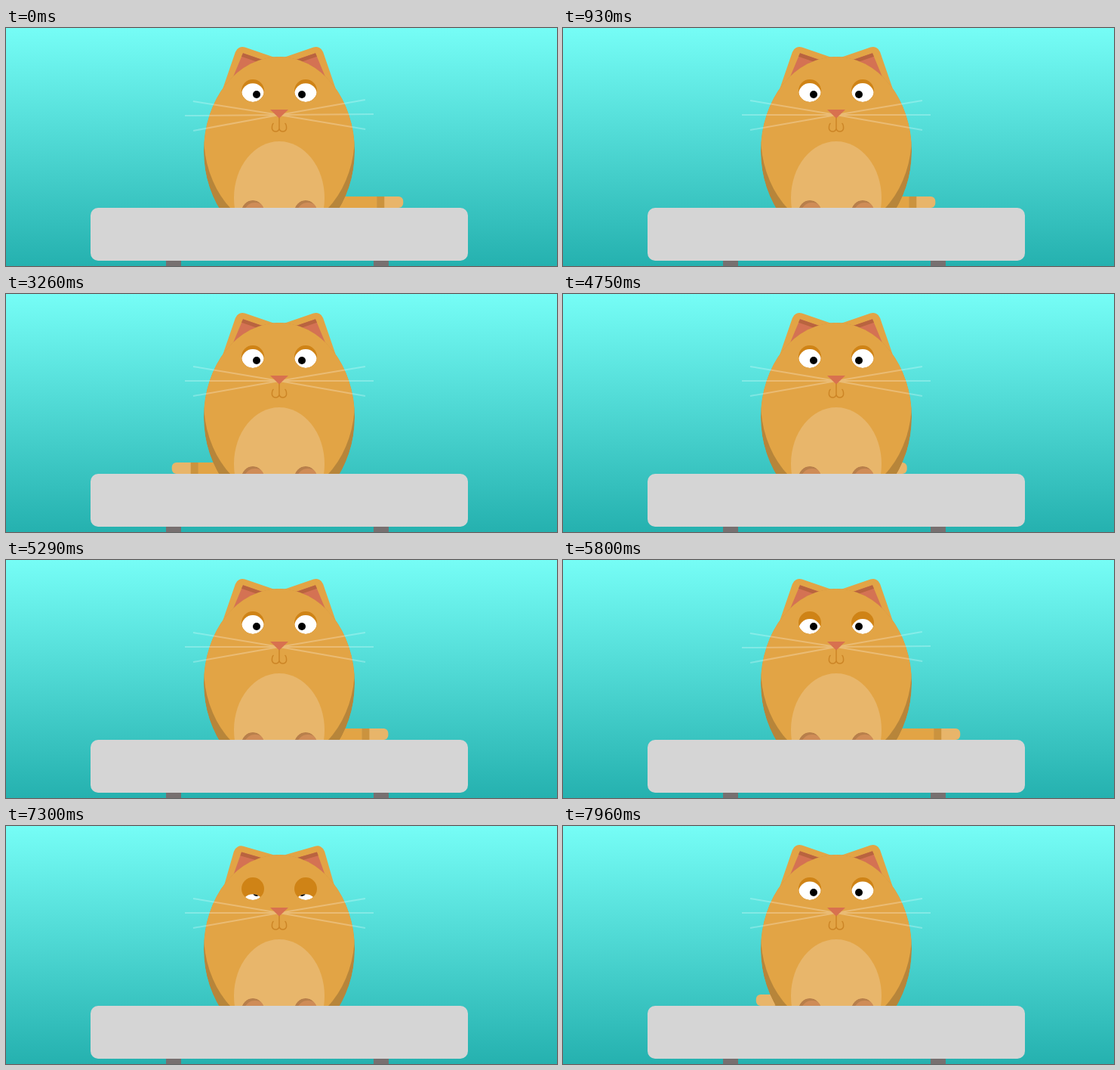
An HTML page that plays this animation: 730 by 315 pixels, repeating every 8 s.

```html
<!DOCTYPE html>
<html lang="en">
<head>
<meta charset="utf-8">
<title>Cat on a table</title>
<style>
  html, body { margin: 0; width: 100%; height: 100%; overflow: hidden; }
  svg { display: block; width: 100vw; height: 100vh; }
</style>
</head>
<body>
<svg viewBox="0 0 730 315">
  <defs>
    <linearGradient id="sky" x2="0" y2="1">
      <stop stop-color="#76fdf6"/>
      <stop offset="1" stop-color="#25b1af"/>
    </linearGradient>
    <clipPath id="bodyClip"><ellipse cx="362" cy="163" rx="100" ry="125"/></clipPath>
    <clipPath id="eyeClip"><circle r="15"/></clipPath>
    <clipPath id="lidClip"><circle id="lid" r="15"/></clipPath>
    <clipPath id="pawClip"><circle r="15"/></clipPath>

    <g id="ear">
      <g id="earTurn">
        <rect x="-45" y="-36" width="60" height="75" rx="10" fill="#e2a445"/>
        <path d="M-35-28H12V20H-38Z" fill="#d47253"/>
        <path d="M-35-28H12V-23H-35.4Z" fill="#b9643f"/>
      </g>
    </g>
    <g id="eye">
      <circle r="15" fill="#cf8316"/>
      <g clip-path="url(#eyeClip)">
        <g clip-path="url(#lidClip)">
          <circle r="15" fill="#fff"/>
          <circle cx="5" cy="5" r="5"/>
        </g>
      </g>
    </g>
    <g id="paw" clip-path="url(#pawClip)">
      <circle r="15" fill="#b87f4b"/>
      <circle cx="3" cy="3" r="15" fill="#cf8c57"/>
    </g>
    <path id="hook" d="M362 133.500A5 5 0 0 1 352.500 133.500Q352 128 354.500 126"/>
    <path id="side" d="M362 115L248 96M362 115H237M362 115L248 135"/>
  </defs>

  <rect width="730" height="315" fill="url(#sky)"/>

  <g id="tail">
    <rect x="-50" y="223" width="100" height="15" rx="6" fill="#e8b56a"/>
    <path d="M-50 223H15V238H-50Z" fill="#e2a445"/>
    <path d="M15 223H25V238H15Z" fill="#cb933e"/>
  </g>

  <use href="#ear" transform="translate(338 71)"/>
  <use href="#ear" transform="translate(386 71) scale(-1 1)"/>

  <g clip-path="url(#bodyClip)">
    <ellipse cx="362" cy="163" rx="100" ry="125" fill="#b7853a"/>
    <ellipse cx="362" cy="143" rx="100" ry="125" fill="#e2a445"/>
  </g>
  <ellipse cx="362" cy="225" rx="60" ry="75" fill="#e8b66b"/>
  <use href="#paw" x="327" y="243"/>
  <use href="#paw" x="397" y="243"/>

  <use href="#eye" transform="translate(327 83)"/>
  <use href="#eye" transform="translate(397 83) scale(-1 1)"/>

  <g fill="none" stroke="#cc8526" stroke-width="1.500">
    <path d="M362 117V134"/>
    <use href="#hook"/>
    <use href="#hook" transform="matrix(-1 0 0 1 724 0)"/>
  </g>
  <g id="whiskers" fill="none" stroke="#fff" stroke-opacity=".25" stroke-width="2">
    <use href="#side"/>
    <use href="#side" transform="matrix(-1 0 0 1 724 0)"/>
  </g>
  <path d="M350 108H374L362 119.500Z" fill="#d8714f"/>

  <path d="M212 300H232V315H212ZM487 300H507V315H487Z" fill="#777070"/>
  <rect x="112" y="238" width="500" height="70" rx="10" fill="#d5d5d5"/>
</svg>
<script>
  const LOOP = 8000, SWING = 2900, RIGHT_AT = 125, BLINK_AT = 6740;
  const [tail, earTurn, lid, whiskers] =
    ['tail', 'earTurn', 'lid', 'whiskers'].map(id => document.getElementById(id));

  // cubic-bezier(.42, 0, .58, 1)
  function ease(x) {
    let u = x;
    for (let i = 0; i < 6; i++) {
      u -= (1.26 * u - .78 * u * u + .52 * u ** 3 - x) / (1.26 - 1.56 * u + 1.56 * u * u);
    }
    return u * u * (3 - 2 * u);
  }

  // distance in time to the nearest moment "at" of a cycle
  function gap(t, at, period) {
    const d = (((t - at) % period) + period) % period;
    return Math.min(d, period - d);
  }

  // eased rise and fall, 1 at the middle
  const bump = (distance, half) => ease(Math.max(0, 1 - distance / half));

  function draw(t) {
    const fromRight = gap(t, RIGHT_AT, 2 * SWING);
    const swing = ease(fromRight / SWING);
    // the tail turns round while hidden behind the body
    tail.setAttribute('transform',
      `translate(${477 - 210 * swing} 0) scale(${swing < .5 ? 1 : -1} 1)`);
    whiskers.setAttribute('transform', `rotate(${-.5 * bump(fromRight, 800)} 362 115)`);

    const fromBlink = gap(t, BLINK_AT, LOOP);
    lid.setAttribute('cy', 5 + 27 * bump(fromBlink, 1340));
    earTurn.setAttribute('transform', `rotate(${19 - 8.5 * bump(fromBlink, 960)})`);
  }

  const start = performance.now();
  function frame() {
    draw((performance.now() - start) % LOOP);
    requestAnimationFrame(frame);
  }
  frame();
</script>
</body>
</html>
```
